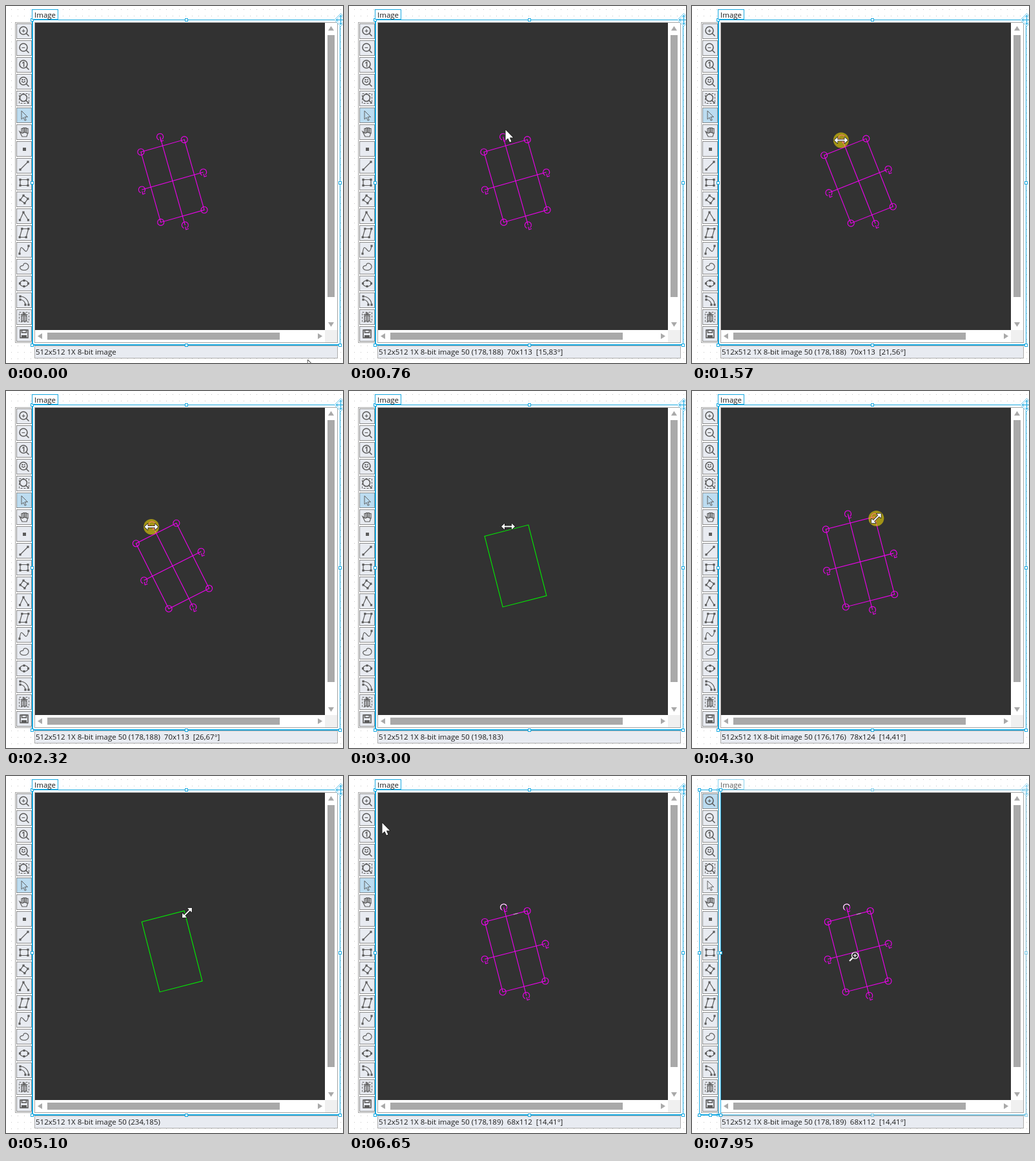
These frames come from a looping animation (522 by 552 pixels, 8 s). An HTML page with a canvas:

```html
<!DOCTYPE html>
<html lang="en">
<head>
<meta charset="utf-8">
<title>Image editor</title>
<style>
html, body { margin: 0; width: 100%; height: 100%; overflow: hidden; background: #fff; }
canvas { display: block; }
</style>
</head>
<body>
<canvas id="stage" width="522" height="552"></canvas>
<script>
const ctx = document.getElementById('stage').getContext('2d');
const LOOP = 8000, TAU = Math.PI * 2;
const BLUE = '#17a8e0', PINK = '#f000f0', GREEN = '#00ee00', INK = '#5c5c5c';
const FONT = '"Open Sans", "Noto Sans", sans-serif';

const ARROW = new Path2D('M0 0V16.5L3.8 13L6.5 19L9 18L6.4 12H11.8Z');
const DOUBLE = new Path2D('M-10.5 0L-5.5-4.8V-1H5.5V-4.8L10.5 0L5.5 4.8V1H-5.5V4.8Z');

// Free pointer moves: start, end, x, y
const MOVES = [
  [0, 760, 242, 191], [800, 970, 237, 205],
  [2980, 3000, 246, 209], [3000, 3410, 280, 209],
  [5080, 5100, 280, 211], [5100, 5560, 252, 213],
  [5960, 6650, 51, 72], [6650, 7000, 29, 42], [7530, 7950, 251, 277]
];

const within = (t, a, b) => t >= a && t < b;
const ramp = (t, a, b) => Math.min(1, Math.max(0, (t - a) / (b - a)));
const dist = (a, b) => Math.hypot(a[0] - b[0], a[1] - b[1]);

function fill(color, x, y, w, h) {
  ctx.fillStyle = color;
  ctx.fillRect(x, y, w, h);
}

function box(x, y, w, h, back, edge) {
  fill(back, x, y, w, h);
  ctx.lineWidth = 1;
  ctx.strokeStyle = edge;
  ctx.strokeRect(x + 0.5, y + 0.5, w - 1, h - 1);
}

function poly(points, color, closed) {
  ctx.beginPath();
  points.forEach(p => ctx.lineTo(...p));
  if (closed) ctx.closePath();
  ctx.strokeStyle = color;
  ctx.stroke();
}

function ring([x, y], r, from = 0, to = TAU) {
  ctx.beginPath();
  ctx.arc(x, y, r, from, to);
  ctx.stroke();
}

function text(s, x, y) {
  ctx.font = '11.5px ' + FONT;
  ctx.fillStyle = '#1c1c1c';
  ctx.fillText(s, x, y);
}

// Toolbar icons, drawn around the button centre

function lens(mark, r = 6) {
  ctx.lineWidth = 1.6;
  ring([-1, -1], r);
  poly([[r * 0.7 - 1, r * 0.7 - 1], [7.5, 7.5]], INK);
  ctx.font = 'bold 10px ' + FONT;
  ctx.textAlign = 'center';
  ctx.fillText(mark, -1, 2.6);
}

function nodes(points) {
  points.forEach(([x, y]) => ctx.fillRect(x - 1.6, y - 1.6, 3.2, 3.2));
}

function shapeIcon(points, closed) {
  poly(points, INK, closed);
  nodes(points);
}

const quad = (w, h, skew = 0) => [[-w + skew, -h], [w + skew, -h], [w - skew, h], [-w - skew, h]];
const diamond = (a, b = a) => [[-a, 0], [0, -b], [a, 0], [0, b]];

function dashedFrame() {
  ctx.lineWidth = 1;
  ctx.setLineDash([3, 2]);
  ctx.strokeRect(-7.5, -7.5, 15, 15);
  ctx.setLineDash([]);
}

function hand() {
  for (let i = 0; i < 4; i++) ctx.strokeRect(-4 + i * 2.5, -7 + Math.abs(i - 1.5), 2.5, 7);
  poly([[-4, 1], [-7, -1], [-3, 7], [4, 7], [6, 1]], INK);
}

function blob() {
  const points = [];
  for (let a = 0; a < TAU; a += 0.2) {
    const r = 7 - 4 * Math.max(0, Math.cos(a + 2.4)) ** 4 - 1.5 * Math.sin(a) ** 2;
    points.push([r * Math.cos(a), r * Math.sin(a)]);
  }
  poly(points, INK, true);
}

function curve() {
  ctx.beginPath();
  ctx.moveTo(-7, 6);
  ctx.bezierCurveTo(-4, -20, 2, 18, 7, -6);
  ctx.stroke();
  nodes([[-7, 6], [7, -6]]);
}

function ellipse() {
  ctx.beginPath();
  ctx.ellipse(0, 0, 6.5, 4.5, 0, 0, TAU);
  ctx.stroke();
  nodes(diamond(6.5, 4.5));
}

function arcBand() {
  ring([-6, 7], 13, -TAU / 4, 0);
  ring([-6, 7], 8, -TAU / 4, 0);
  nodes([[-6, -6], [-6, -1], [2, 7], [7, 7]]);
}

function trash() {
  dashedFrame();
  ctx.lineWidth = 1.4;
  ctx.strokeRect(-4, -2, 8, 8);
  poly([[-5.5, -4], [5.5, -4]], INK);
  ctx.strokeRect(-1.5, -6, 3, 2);
  for (const x of [-1.3, 1.3]) poly([[x, -1], [x, 5]], INK);
}

function floppy() {
  ctx.lineWidth = 1.6;
  ctx.strokeRect(-6, -6, 12, 12);
  ctx.strokeRect(-3.5, -6, 7, 4);
  ctx.fillRect(-4, 2, 8, 4);
}

const ICONS = [
  () => lens('+'),
  () => lens('−'),
  () => lens('1'),
  () => { lens(''); ctx.setLineDash([2, 1]); ctx.strokeRect(-3, -3, 4, 4); },
  () => { dashedFrame(); lens('', 5.5); },
  () => { ctx.translate(-4, -7); ctx.scale(0.8, 0.8); ctx.stroke(ARROW); },
  hand,
  () => ctx.fillRect(-2, -2, 5, 5),
  () => shapeIcon([[-6, 6], [6, -6]]),
  () => shapeIcon(quad(6, 4.5), true),
  () => { ctx.rotate(-0.15); shapeIcon(diamond(6), true); },
  () => shapeIcon([[-6.5, 6], [-1, -6], [6.5, 6]]),
  () => shapeIcon(quad(5, 6.5, 1.8), true),
  curve, blob, ellipse, arcBand, trash, floppy
];

function drawToolbar(active) {
  box(14, 25, 28, 496, '#fff', '#a5a5a5');
  ICONS.forEach((icon, i) => {
    const top = 27 + i * 26;
    box(16, top, 24, 24, i === active ? '#bcdcf0' : '#e8ebf1', '#8c8c8c');
    ctx.save();
    ctx.translate(28, top + 12);
    ctx.strokeStyle = ctx.fillStyle = INK;
    ctx.lineWidth = 1.2;
    icon();
    ctx.restore();
  });
}

function triangle(x, y, turn) {
  ctx.save();
  ctx.translate(x, y);
  ctx.rotate(turn * TAU / 4);
  ctx.fillStyle = '#a9a9a9';
  ctx.fill(new Path2D('M4 0L-3 4.5V-4.5Z'));
  ctx.restore();
}

function drawPanel() {
  fill('#fff', 0, 0, 522, 552);
  for (let y = 5; y < 552; y += 10)
    for (let x = 8; x < 522; x += 10) fill('#c4c4c4', x, y, 1, 1);
  box(41, 21, 477, 504, '#fff', '#c4c4c4');
  box(44, 25, 470, 496, '#fff', '#a5a5a5');
  fill('#323232', 45, 26, 449, 475);
  fill('#f0f0f0', 494, 501, 19, 19);
  fill('#a9a9a9', 498, 45, 11, 405);
  fill('#a9a9a9', 64, 505, 360, 11);
  triangle(503.5, 35, 3);
  triangle(503.5, 492, 1);
  triangle(53, 510.5, 2);
  triangle(486, 510.5, 0);
  box(44, 525, 470, 20, '#e8ebf1', '#adadad');
}

function drawAdorner(left, right, thick) {
  const xs = [left, Math.round((left + right) / 2), right], ys = [21, 273, 524];
  fill(BLUE, left, 21, right - left, 1);
  fill(BLUE, left, 523, right - left, 2);
  fill(BLUE, left, 21, thick, 503);
  fill(BLUE, right, 21, 1, 503);
  xs.forEach((x, i) => ys.forEach((y, j) => {
    if (i !== 1 || j !== 1) box(x - 2, y - 2, 5, 5, '#fff', BLUE);
  }));
}

function drawImageAdorner(alpha) {
  ctx.save();
  ctx.globalAlpha = alpha;
  drawAdorner(40, 517, 2);
  box(40, 5, 41, 16, '#fff', BLUE);
  ctx.globalAlpha = Math.sqrt(alpha);
  text('Image', 44, 18);
  ctx.globalAlpha = alpha;
  ctx.translate(518.5, 21.5);
  ctx.fillStyle = '#e2f4fc';
  poly(diamond(10), BLUE, true);
  ctx.fill();
  for (let i = 0; i < 4; i++) {
    ctx.rotate(TAU / 4);
    poly([[0, 0], [7, 0], [5, -2], [7, 0], [5, 2]], BLUE);
  }
  ctx.restore();
}

function drawToolsAdorner(alpha) {
  ctx.globalAlpha = alpha;
  drawAdorner(11, 44, 1);
  ctx.globalAlpha = 1;
}

// Turned by the top handle, then resized by a corner with the opposite corner fixed
function getShape(t) {
  const grow = ramp(t, 3600, 4020), shrink = ramp(t, 4230, 4510) ** 2;
  const w = Math.round(70 + 9 * grow - 11 * shrink);
  const h = Math.round(113 + 12 * grow - 13 * shrink);
  const angle = 15.83 + 15.75 * ramp(t, 1410, 1850) - 17.17 * ramp(t, 2180, 2670);
  const c = Math.cos(angle * TAU / 360), s = Math.sin(angle * TAU / 360);
  const dx = (w - 70) / 2, dy = (113 - h) / 2;
  const cx = 257.5 + dx * c + dy * s, cy = 270 - dx * s + dy * c;
  const at = (x, y) => [cx + x * c + y * s, cy - x * s + y * c];
  const reach = 14.5;
  return {
    w, h, angle, cx, cy, at,
    corners: quad(w / 2, h / 2).map(p => at(...p)),
    handles: diamond(w / 2 + reach, h / 2 + reach).map(p => at(...p))
  };
}

function turnHandle([x, y]) {
  ring([x, y], 5, 1.9, TAU + 0.9);
  poly([[x + 0.5, y + 2.5], [x + 1.5, y + 7], [x + 5.5, y + 5.5]], PINK);
}

function drawShape({ corners, handles, at, h }, selected, marked) {
  ctx.save();
  ctx.translate(0.5, 0.5);
  ctx.lineWidth = 1.1;
  poly(corners, selected ? PINK : GREEN, true);
  if (selected) {
    const [left, top, right, bottom] = handles;
    poly([top, bottom], PINK);
    poly([left, right], PINK);
    corners.forEach(p => ring(p, 5));
    handles.forEach(turnHandle);
    if (marked) {
      ctx.strokeStyle = '#fff';
      ring(top, 5, 2.3, 5.8);
      poly([at(12, -h / 2), at(19, -h / 2)], '#c8b4c8');
    }
  }
  ctx.restore();
}

function getPointer(t, { corners, handles }) {
  const grab = (p, dx, dy) => [p[0] + dx, p[1] + dy];
  if (within(t, 1410, 2980)) return grab(handles[1], -1, 3);
  if (within(t, 3600, 5080)) return grab(corners[1], 2.5, 2.5);
  return MOVES.reduce(([x, y], [start, end, toX, toY]) => {
    const p = ramp(t, start, end);
    return [x + (toX - x) * p, y + (toY - y) * p];
  }, [467, 547]);
}

function pointerKind(t, pos, { corners, handles }) {
  if (t > 7530 && pos[0] > 45) return 'zoom';
  if (dist(pos, handles[1]) < 11) return 'ew';
  if (dist(pos, corners[1]) < 9) return 'nesw';
  return 'arrow';
}

function drawPointer(kind, [x, y]) {
  ctx.save();
  ctx.translate(x + 0.5, y + 0.5);
  ctx.lineJoin = 'round';
  ctx.fillStyle = '#fff';
  if (kind === 'zoom') {
    ctx.lineWidth = 2.2;
    poly([[-3, 4], [-7.5, 8.5]], '#fff');
    ctx.lineWidth = 1.2;
    ring([1, 0], 5);
    poly([[-1.5, 0], [3.5, 0]], '#fff');
    poly([[1, -2.5], [1, 2.5]], '#fff');
  } else {
    const path = kind === 'arrow' ? ARROW : DOUBLE;
    if (kind === 'nesw') ctx.rotate(-TAU / 8);
    ctx.strokeStyle = '#111';
    ctx.lineWidth = 1.4;
    ctx.stroke(path);
    ctx.fill(path);
  }
  ctx.restore();
}

function statusText({ w, h, cx, cy, angle }, selected, kind, [x, y]) {
  const base = '512x512 1X 8-bit image', r = Math.round;
  const inside = within(x, 45, 494) && within(y, 26, 501);
  if (!inside) return base;
  if (!selected) return `${base} 50 (${r(x - (kind === 'ew' ? 48 : 46))},${r(y - 26)})`;
  const degrees = angle.toFixed(2).replace('.', ',');
  return `${base} 50 (${r(cx - 45 - w / 2)},${r(cy - 26 - h / 2)})  ${w}x${h}  [${degrees}°]`;
}

function draw(t) {
  const shape = getShape(t);
  const pos = getPointer(t, shape);
  const kind = pointerKind(t, pos, shape);
  const selected = !within(t, 3000, 3670) && !within(t, 5100, 5760);
  const pressed = within(t, 1300, 3000) || within(t, 3410, 5100) || within(t, 5760, 5830);

  drawPanel();
  drawToolbar(t < 7250 ? 5 : 0);
  drawShape(shape, selected, t >= 5830);
  text(statusText(shape, selected, kind, pos), 46, 539);
  drawImageAdorner(1 - ramp(t, 6790, 7070) + 0.5 * ramp(t, 7670, 7950));
  drawToolsAdorner(ramp(t, 6720, 6930));
  if (pressed) {
    ctx.fillStyle = 'rgba(255, 230, 0, 0.55)';
    ctx.beginPath();
    ctx.arc(pos[0] + 0.5, pos[1] + 0.5, 12, 0, TAU);
    ctx.fill();
  }
  drawPointer(kind, pos);
}

const begin = performance.now();
function tick() {
  const t = (performance.now() - begin) % LOOP;
  draw(t - t % 10);
  requestAnimationFrame(tick);
}
tick();
</script>
</body>
</html>
```
